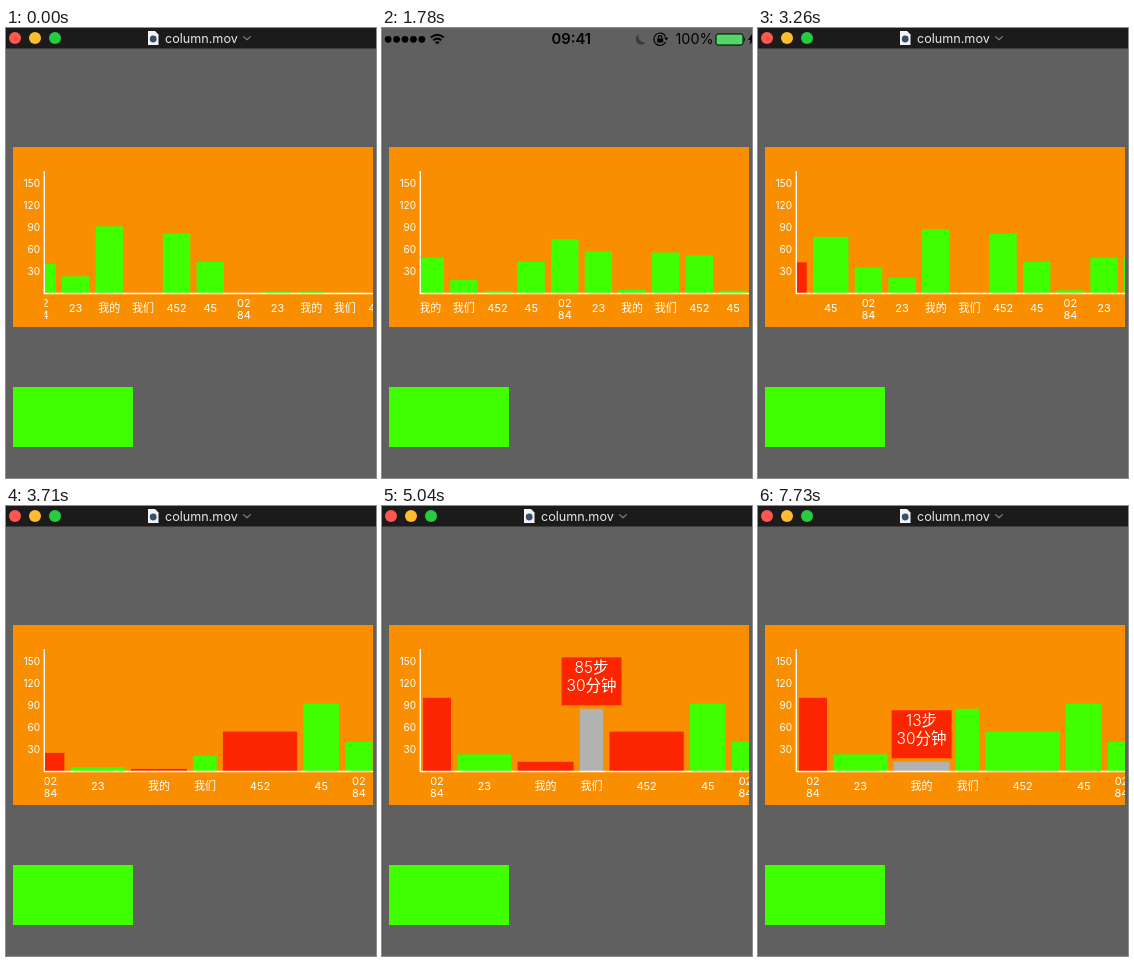
An HTML page for the animation above (8 s loop, 370 by 450 pixels).

```html
<!DOCTYPE html>
<html lang="zh">
<head>
<meta charset="utf-8">
<title>Column chart</title>
<style>
  html, body { margin: 0; width: 100%; height: 100%; overflow: hidden; background: #606060; }
  svg { display: block; width: 370px; height: 450px; }
  text { font-family: Inter, "Noto Sans CJK SC", "Noto Sans CJK", sans-serif; }
  .label { fill: #fff; font-size: 11px; text-anchor: middle; }
  .tick { fill: #fff; font-size: 10px; text-anchor: end; }
  .tip { fill: #fff; font-size: 15.5px; font-weight: 300; text-anchor: middle; }
</style>
</head>
<body>
<svg viewBox="0 0 370 450">
  <defs><clipPath id="plot"><rect x="38.5" y="119" width="328.5" height="180"/></clipPath></defs>
  <rect width="370" height="450" fill="#606060"/>

  <g id="status">
    <g id="dots"></g>
    <g fill="none" stroke="#000" stroke-width="2">
      <path d="M48.8 9.6Q55.3 4 61.8 9.6"/>
      <path d="M51.3 12.3Q55.3 9 59.3 12.3"/>
    </g>
    <path d="M52.9 14.2Q55.3 12.3 57.7 14.2L55.3 16.6Z"/>
    <text x="189.3" y="16.4" font-size="14.8" font-weight="600" text-anchor="middle">09:41</text>
    <path d="M257 6A5.6 5.6 0 1 0 264 14.2A6 6 0 0 1 257 6Z" fill="#3c3c3c"/>
    <g fill="none" stroke="#000" stroke-width="1.2">
      <path d="M283.6 8.4A6.2 6.2 0 1 0 283.6 14"/>
      <path d="M276.4 10.6V9.4A1.8 1.8 0 0 1 280 9.4V10.6"/>
    </g>
    <path d="M275.2 10.4h6v4.2h-6ZM282 9.4h4.4l-2 3Z"/>
    <text x="293.5" y="16.4" font-size="14.4">100%</text>
    <rect x="334" y="6" width="27" height="11" rx="2" fill="#53d769" stroke="#000"/>
    <path d="M362 9.5q2 2 0 4ZM370 6l-4 6h2.5l-1 5 2.5-3Z"/>
  </g>

  <g id="titleBar">
    <rect width="370" height="20.5" fill="#1b1b1b"/>
    <circle cx="9" cy="10" r="6" fill="#ff5650"/>
    <circle cx="29" cy="10" r="6" fill="#ffbd2e"/>
    <circle cx="49" cy="10" r="6" fill="#27cb40"/>
    <path d="M142 3h7l3.500 3.500V17H142Z" fill="#f4f4f4"/>
    <circle cx="147.200" cy="11" r="3.400" fill="#35506e"/>
    <text x="159" y="14.800" font-size="12.600" fill="#e8e8e8">column.mov</text>
    <path d="M237.300 8.400L241 11.600L244.700 8.400" fill="none" stroke="#858585" stroke-width="1.200"/>
  </g>

  <rect x="7" y="119" width="360" height="180" fill="#f98f00"/>
  <g id="ticks"></g>
  <g clip-path="url(#plot)"><g id="columns"></g></g>
  <path d="M38.300 143V265.500H367" fill="none" stroke="#fff" stroke-width="1.300"/>
  <g id="popup">
    <rect x="-30" width="60" height="48" fill="#fb2600"/>
    <text id="steps" class="tip" y="15.500"></text>
    <text class="tip" y="33.700">30分钟</text>
  </g>
  <rect x="7" y="359" width="120" height="60" fill="#40ff00"/>
</svg>

<script>
const LOOP = 8000, STEP = 148.5, LAST_STEP = 52;
const BASE = 265.3, UNIT = 0.735, GAP = 6.3, GROW = 650;
const GREEN = '#40ff00', RED = '#fb2600', GRAY = '#b2b2b2';

// Chart data: labels repeat, the first columns have their own widths
const names = ['0284', '23', '我的', '我们', '452', '45'];
const firstWidths = [28, 54, 56, 23.3, 74.2, 35.5];
const values = [100, 23, 13, 85, 54, 92, 40, 23, 91, 0, 81, 43,
                4, 48, 48, 18, 3, 43, 92, 73, 6, 76, 73, 5];

// Each swipe eases the scroll by a distance around its middle time
const swipes = [
  { mid: 0, pace: 150, by: 95 },
  { mid: 1430, pace: 40, by: 209.5 },
  { mid: 2715, pace: 36, by: -331.5 },
  { mid: 3640, pace: 36, by: -275 },
  { mid: 4091, pace: 80, by: 22 }    // bounce back to the edge
];
const taps = [{ at: 5040, column: 3 }, { at: 5940, column: 4 }, { at: 6980, column: 2 }];

const $ = id => document.getElementById(id);
const ramp = (t, from, to) => Math.min(1, Math.max(0, (t - from) / (to - from)));
const smooth = u => u * u * (3 - 2 * u);
const scrollAt = t => swipes.reduce(
  (sum, { mid, pace, by }) => sum + by / (1 + Math.exp((mid - t) / pace)), 280);

function add(parent, tag, attrs, text) {
  const el = document.createElementNS('http://www.w3.org/2000/svg', tag);
  for (const key in attrs) el.setAttribute(key, attrs[key]);
  if (text) el.textContent = text;
  return parent.appendChild(el);
}

for (let i = 0; i < 5; i++) add($('dots'), 'circle', { cx: 6.2 + 8.4 * i, cy: 11.3, r: 3.4 });
for (let v = 30; v <= 150; v += 30)
  add($('ticks'), 'text', { class: 'tick', x: 34, y: BASE - v * UNIT + 3.5 }, String(v));

let nextX = 41;
const columns = values.map((value, i) => {
  const x = nextX, width = firstWidths[i] || 27.35;
  const center = x + width / 2, name = names[i % names.length];
  const label = (text, y) => add($('columns'), 'text', { class: 'label', x: center, y }, text);
  nextX += width + GAP;
  if (name.length === 4) {
    label(name.slice(0, 2), 279);
    label(name.slice(2), 291.2);
  } else label(name, 284.1);
  return { value, center, bar: add($('columns'), 'rect', { x, width }) };
});

// When a column starts to grow after a swipe brings it into view
function growStart(i, t) {
  if (i >= 18) return 1318 + 12 * (i - 18);
  if (i >= 12) return -75;
  if (i >= 4) return t < 2600 ? -GROW : 2814 - 29 * (i - 4);
  return 3500;
}

function draw(ms) {
  const t = Math.min(LAST_STEP, Math.floor((ms + 14) / STEP)) * STEP;
  const done = taps.filter(tap => tap.at <= t + 10).map(tap => tap.column);
  const selected = done[done.length - 1];
  const color = i => i === selected ? GRAY
    : i === 0 || ((i === 2 || i === 4) && !done.includes(i)) ? RED : GREEN;

  $('titleBar').setAttribute('opacity', 1 - ramp(t, 1340, 1780) + ramp(t, 2230, 2530));
  $('columns').setAttribute('transform', `translate(${-scrollAt(t)} 0)`);
  columns.forEach(({ value, bar }, i) => {
    const start = growStart(i, t);
    const height = value * UNIT * smooth(ramp(t, start, start + GROW));
    bar.setAttribute('y', BASE - height);
    bar.setAttribute('height', height);
    bar.setAttribute('fill', color(i));
  });

  const chosen = columns[selected];
  $('popup').setAttribute('visibility', chosen ? 'visible' : 'hidden');
  if (chosen) {
    const top = BASE - chosen.value * UNIT - 51.5;
    $('popup').setAttribute('transform', `translate(${chosen.center} ${top})`);
    $('steps').textContent = chosen.value + '步';
  }
}

const begin = performance.now();
function tick() {
  draw((performance.now() - begin) % LOOP);
  requestAnimationFrame(tick);
}
tick();
</script>
</body>
</html>
```
